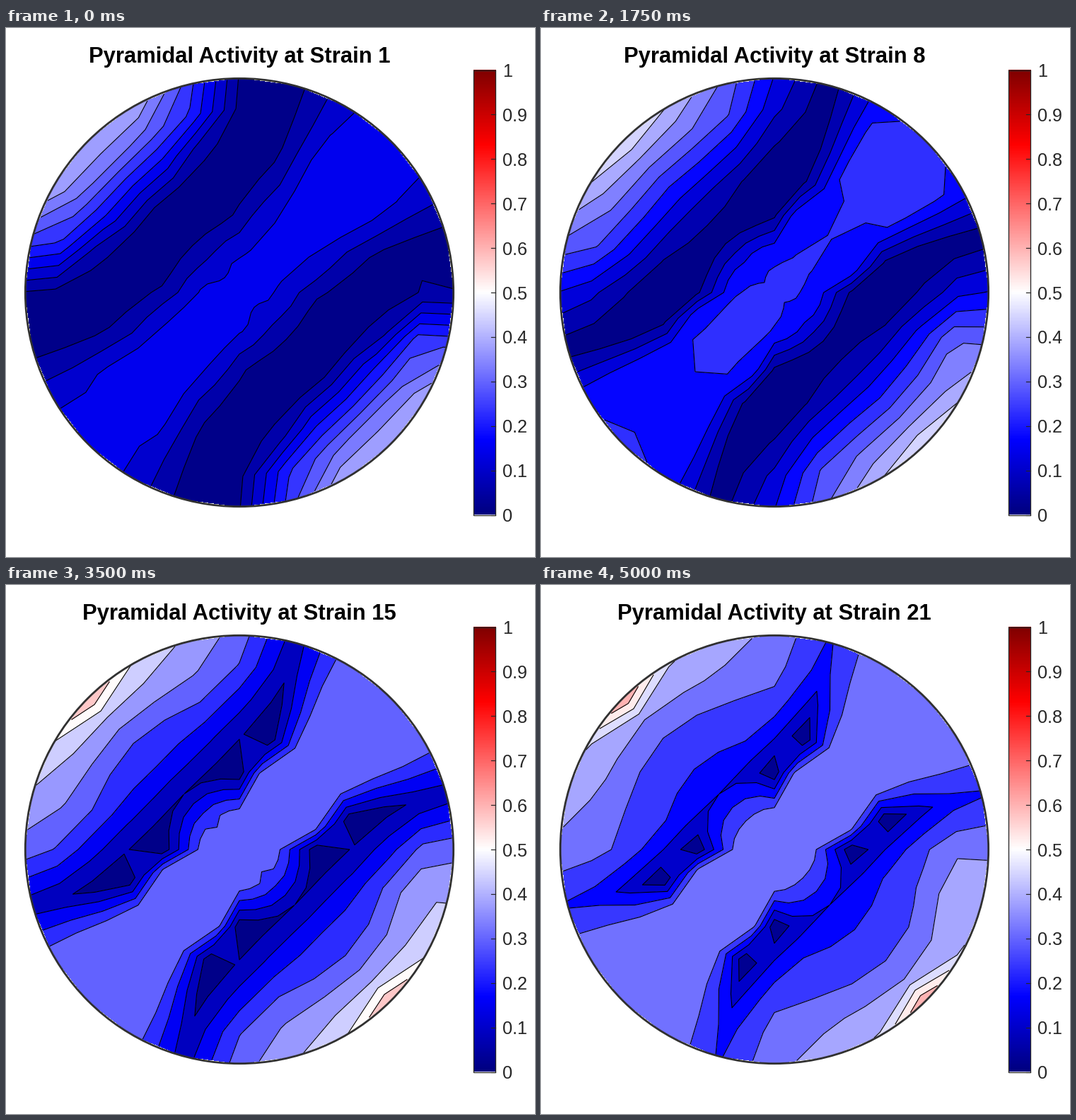
Write a matplotlib script that moves like this. It is 748 px wide and 748 px high and loops after 5250 ms.

```python
import numpy as np
import matplotlib.pyplot as plt
from matplotlib.animation import FuncAnimation
from matplotlib.colors import LinearSegmentedColormap
from matplotlib.patches import Circle, Rectangle

SIZE, DPI = 748, 100
PT = 72 / DPI                      # points per pixel
CX, CY, R = 330, 374, 302.7
STRAINS = 21
INK = "#262626"

plt.rcParams["font.family"] = "Liberation Sans"
cmap = LinearSegmentedColormap.from_list("bwr_dark", [
    (0, (0, 0, .5)), (1 / 6, (0, 0, 1)), (.5, (1, 1, 1)),
    (5 / 6, (1, 0, 0)), (1, (.5, 0, 0))], N=256)

# Equal-area polar grid, 15 degrees apart both ways
theta = np.radians(np.arange(0, 361, 15))
tilt = np.radians(np.arange(0, 91, 15))[:, None]
rad = R * np.sqrt(2) * np.sin(tilt / 2)
X = CX + rad * np.cos(theta)
Y = CY - rad * np.sin(theta)

# Direction cosines along the 45 degree axis, the 135 degree axis and the normal
turn = theta - np.pi / 4
along = np.sin(tilt) * np.cos(turn)
across = np.sin(tilt) * np.sin(turn)
normal = np.cos(tilt) + 0 * theta
lat = np.arcsin(np.clip(np.abs(across), 0, 1))
lat_deg = np.degrees(lat)
steep = normal**2 / np.maximum(along**2 + normal**2, 1e-9)
shade = 1 - .35 * np.sin(2 * lat) * steep      # weaker towards the normal

core = np.clip(1 - lat_deg / 20, 0, 1)         # belt along the 45 degree axis
swell = core * np.cos(1.5 * tilt)**2
sway = core * np.sin(2 * np.pi * rad / R * np.cos(turn))
spot = 1.2 * np.exp(-((X - 588)**2 + (Y - 415)**2) / 40**2)


def mix(a, b, t):
    return a[0] + (b[0] - a[0]) * t, a[1] + (b[1] - a[1]) * t


def field(w):
    """Activity in contour steps, 0 to 9, at progress w."""
    fast, slow = 1 - (1 - w)**2, w**1.5
    # (latitude, activity) knots that drift as the valley narrows
    knots = [
        mix((0, 3.75), (0, 4.7), slow),
        mix((13, 3.3), (15, 4.9), fast),
        mix((23, .95), (20.5, .1), fast),
        mix((37, .2), (21.5, .2), fast),
        mix((46, 1.0), (27, 2.3), w),
        mix((57, 5.2), (38, 4.4), slow),
        mix((75, 8.9), (75, 6.1), w),
        (90, 9)]
    u = np.interp(lat_deg, *zip(*knots)) * shade
    u += .5 * np.sin(np.pi * np.sqrt(w)) * swell
    u -= .25 * (1 - w**2) * sway
    return np.clip(u + spot, 0, 9)


def levels(strain, w):
    low = .012 + .015 * w**6
    step = .0445 + .027 / (1 + np.exp((9.3 - strain) / 2))
    return low + step * np.arange(9)


fig = plt.figure(figsize=(SIZE / DPI, SIZE / DPI), dpi=DPI, facecolor="white")
ax = fig.add_axes([0, 0, 1, 1])
ax.axis("off")

# Colour bar
X0, X1, TOP, BOTTOM = 661, 692.5, 59.5, 688.5
ax.imshow(np.linspace(1, 0, 256)[:, None], cmap=cmap, vmin=0, vmax=1,
          extent=(X0, X1, BOTTOM, TOP), aspect="auto", interpolation="nearest")
ax.add_patch(Rectangle((X0, TOP), X1 - X0, BOTTOM - TOP, fill=False,
                       ec=INK, lw=1.3 * PT, zorder=5))
for k in range(11):
    y = BOTTOM + (TOP - BOTTOM) * k / 10
    ax.plot([X1 - 6, X1], [y, y], color=INK, lw=1.2 * PT, zorder=5)
    ax.text(702, y + 9.5, f"{k / 10:g}", fontsize=25.3 * PT, color=INK,
            va="baseline")

ax.add_patch(Circle((CX, CY), R, fill=False, ec="#303030", lw=2.8 * PT, zorder=6))
title = ax.text(CX, 49, "", fontsize=31 * PT, weight="bold", color="black",
                ha="center", va="baseline")
drawn = []


def draw(i):
    while drawn:
        drawn.pop().remove()
    w = i / (STRAINS - 1)
    u = field(w)
    drawn.append(ax.contourf(X, Y, u, levels=[-.01, *range(1, 9), 9.01],
                             colors=cmap(levels(i + 1, w)), zorder=2))
    drawn.append(ax.contour(X, Y, u, levels=range(1, 9), colors="black",
                            linewidths=1.1 * PT, zorder=3))
    ax.set(xlim=(0, SIZE), ylim=(SIZE, 0))
    title.set_text(f"Pyramidal Activity at Strain {i + 1}")
    return [title]


anim = FuncAnimation(fig, draw, frames=STRAINS, interval=250,
                     init_func=lambda: [title], repeat=True, repeat_delay=0)
plt.show()
```
